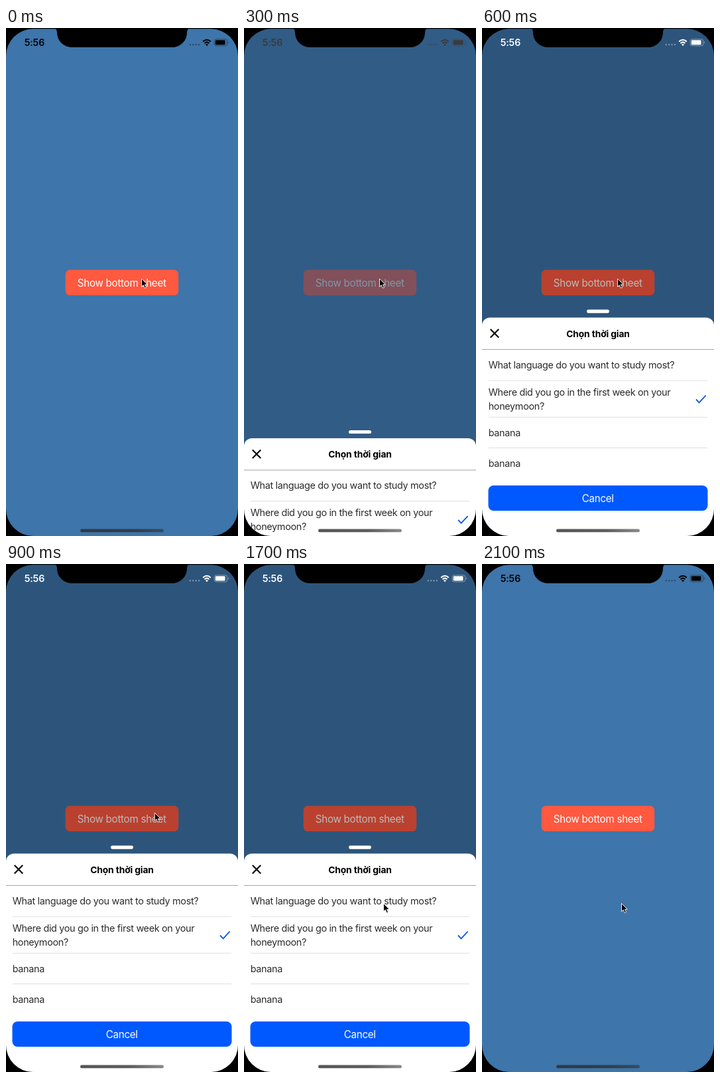
Recreate the animation shown at these times as an HTML page. Size 350x764 px, loop 2200 ms.

```html
<!DOCTYPE html>
<html lang="en">
<head>
<meta charset="utf-8">
<title>Bottom sheet</title>
<style>
  html, body { margin: 0; width: 100%; height: 100%; overflow: hidden; background: #000; }
  svg { display: block; width: 350px; height: 764px; }
  text { font-family: Inter, Roboto, sans-serif; }
  .label { text-anchor: middle; fill: #fff; font-size: 15.2px; letter-spacing: -.29px; }
  .title { text-anchor: middle; font-size: 13.8px; font-weight: 700; letter-spacing: -.12px; }
  .row { fill: #2b2b2d; font-size: 14.4px; letter-spacing: -.33px; }
  .line { stroke: #dedee2; }
</style>
</head>
<body>
<svg viewBox="0 0 350 764">
  <defs>
    <clipPath id="screen"><rect y="1.3" width="350" height="762.7" rx="41"/></clipPath>
    <linearGradient id="bar">
      <stop stop-color="#2b2b2b" stop-opacity=".8"/>
      <stop offset=".6" stop-color="#2b2b2b" stop-opacity=".76"/>
      <stop offset="1" stop-color="#2b2b2b" stop-opacity=".55"/>
    </linearGradient>
  </defs>
  <rect width="350" height="764"/>
  <g clip-path="url(#screen)">
    <rect width="350" height="764" fill="#3e75aa"/>
    <g id="button">
      <rect x="89.7" y="363.8" width="170.5" height="38.3" rx="6.5" fill="#ff5940"/>
      <text class="label" x="174.7" y="388.5">Show bottom sheet</text>
    </g>
    <rect id="shade" width="350" height="764"/>

    <g id="sheet">
      <rect x="158" y="-12" width="34" height="5.2" rx="2.6" fill="#fff"/>
      <path d="M0 340V12A12 12 0 0 1 12 0H338A12 12 0 0 1 350 12V340Z" fill="#fff"/>
      <path d="M12.8 17.6l12.4 12.4m0-12.4l-12.4 12.4" stroke="#000" stroke-width="2.1"/>
      <text class="title" x="175" y="29">Chọn thời gian</text>
      <path d="M0 48H350" stroke="#a4a4ac"/>
      <text class="row" id="first" x="9.7" y="76.5">What language do you want to study most?</text>
      <path class="line" d="M10 94.7H340M10 149.8H340M10 196H340"/>
      <text class="row" x="9.7" y="117.5">Where did you go in the first week on your</text>
      <text class="row" x="9.7" y="138">honeymoon?</text>
      <path d="M323 123l4.6 4.8 10-10.6" fill="none" stroke="#105ce2" stroke-width="1.9"/>
      <text class="row" x="9.7" y="178">banana</text>
      <text class="row" x="9.7" y="224.5">banana</text>
      <rect x="9.5" y="252.5" width="331" height="38" rx="8" fill="#0059ff"/>
      <text class="label" x="174.7" y="277">Cancel</text>
    </g>

    <g id="status">
      <text x="27.7" y="27" font-size="14.2" font-weight="600" letter-spacing="-.15">5:56</text>
      <path d="M277.8 25H292" stroke="currentColor" stroke-width="2.6" stroke-linecap="round"
        stroke-dasharray="0 4.4" opacity=".35"/>
      <path d="M297.2 20.5Q303 15 308.8 20.5M299.5 23Q303 19.7 306.5 23" fill="none"
        stroke="currentColor" stroke-width="2"/>
      <path d="M303 27l-2.1-2.3q2.1-1.6 4.2 0z"/>
      <rect x="314.3" y="16.8" width="19.4" height="10" rx="2.8" fill="none" stroke="currentColor" opacity=".4"/>
      <rect x="315.8" y="18.3" width="14.8" height="7" rx="1.4"/>
      <path d="M335 20q2.2 1.8 0 3.6z" opacity=".45"/>
    </g>
    <rect x="112" y="753.6" width="126" height="4.6" rx="2.3" fill="url(#bar)"/>
  </g>
  <path d="M72 0Q77 1 77 7A22 22 0 0 0 99 29H251A22 22 0 0 0 273 7Q273 1 278 0Z"/>
  <path id="cursor" d="M0 0V12.2L2.8 9.6 4.8 14.2 7 13.2 5 8.9H8.8Z" stroke="#fff" stroke-width=".9"/>
</svg>
<script>
  const LOOP = 2200, STEP = 100, OPEN_Y = 435.5, HEIGHT = 328.5;
  const el = id => document.getElementById(id);

  // Progress from 0 to 1 between start and start + length.
  const ramp = (t, start, length) => Math.min(1, Math.max(0, (t - start) / length));
  const easeOut = p => Math.sin(p * Math.PI / 2);
  const easeInOut = p => p * p * (3 - 2 * p);
  const place = (id, x, y) => el(id).setAttribute('transform', `translate(${x} ${y})`);

  function draw() {
    const t = Math.floor(performance.now() % LOOP / STEP) * STEP;

    const open = easeOut(ramp(t, 227, 247)) - easeOut(ramp(t, 1825, 247));
    place('sheet', 0, OPEN_Y + HEIGHT * (1 - open));
    el('sheet').style.display = open > 0 ? '' : 'none';
    el('shade').style.opacity = .27 * open ** .3;

    // Touch feedback
    el('button').style.opacity = 1 - .8 * (ramp(t, 0, 150) - ramp(t, 240, 150));
    el('first').style.opacity = 1 - .2 * ramp(t, 1800, 100);

    const ink = Math.round(255 * (ramp(t, 260, 175) - ramp(t, 1920, 175)));
    el('status').style.color = el('status').style.fill = `rgb(${ink},${ink},${ink})`;

    // The pointer drifts right over the button, then drops to the first row.
    const drift = easeOut(ramp(t, 600, 600)), drop = easeInOut(ramp(t, 1200, 500));
    place('cursor', 204.5 + 28 * drift - 22 * drop, 377 - 4 * drift + 137.5 * drop);
    requestAnimationFrame(draw);
  }
  draw();
</script>
</body>
</html>
```
